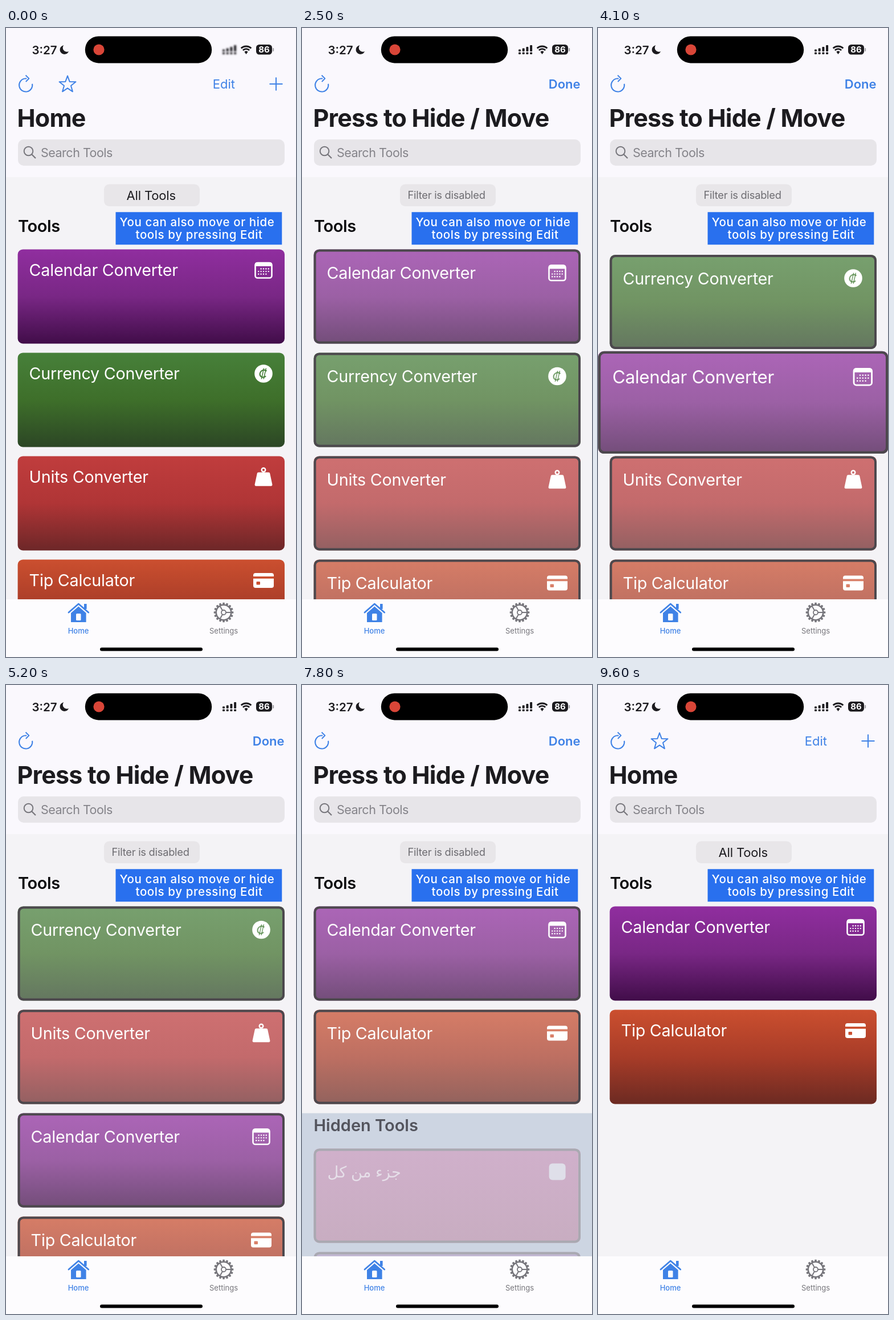
Animation of 509 by 1101 pixels, one loop 9.7 s. Source, as an HTML page with a canvas:

```html
<!DOCTYPE html>
<html lang="en">
<head>
<meta charset="utf-8">
<title>Editing tools</title>
<style>
  html, body { margin: 0; width: 509px; height: 1101px; overflow: hidden; background: #f4f3f6; }
  canvas { display: block; }
</style>
</head>
<body>
<canvas id="stage" width="509" height="1101"></canvas>
<script>
const ctx = document.getElementById('stage').getContext('2d');
const LOOP = 9700, STEP = 100;
const BLUE = '#3f82e6', INK = '#1c1b1f', GREY = '#77767c';
const CARD = { x: 20.6, y: 387.4, w: 468.4, h: 165, pitch: 181 };

const tools = {
  calendar: { title: 'Calendar Converter', colors: ['#902e9f', '#792785', '#410d49'], icon: calendarIcon },
  currency: { title: 'Currency Converter', colors: ['#47803a', '#3e6f2a', '#2c4625'], icon: currencyIcon },
  units: { title: 'Units Converter', colors: ['#c03d3d', '#b03536', '#6d2728'], icon: weightIcon },
  tip: { title: 'Tip Calculator', colors: ['#cb4f2f', '#a83c28', '#6c2a22'], icon: paymentIcon }
};

const clamp = v => Math.max(0, Math.min(1, v));
const ramp = (t, from, to) => clamp((t - from) / (to - from));
const easeOut = (t, from, to) => 1 - (1 - ramp(t, from, to)) ** 3;
const easeBoth = (t, from, to) => { const u = ramp(t, from, to); return u * u * (3 - 2 * u); };

function box(x, y, w, h, r, color) {
  ctx.beginPath();
  ctx.roundRect(x, y, w, h, r);
  ctx.fillStyle = color;
  ctx.fill();
}

function disc(x, y, r, color) {
  ctx.beginPath();
  ctx.arc(x, y, r, 0, 7);
  ctx.fillStyle = color;
  ctx.fill();
}

function shape(points, close) {
  ctx.beginPath();
  points.forEach(p => ctx.lineTo(...p));
  if (close) ctx.closePath();
}

function stroke(color, width) {
  ctx.strokeStyle = color;
  ctx.lineWidth = width;
  ctx.stroke();
}

function text(str, x, y, size, color, { weight = 400, spacing = 0, align = 'left' } = {}) {
  ctx.font = `${weight} ${size}px Inter, "DejaVu Sans", sans-serif`;
  ctx.letterSpacing = spacing + 'px';
  ctx.textAlign = align;
  ctx.fillStyle = color;
  ctx.fillText(str, x, y);
}

function at(x, y, draw) {
  ctx.save();
  ctx.translate(x, y);
  draw();
  ctx.restore();
}

function withAlpha(alpha, draw) {
  if (alpha <= 0) return;
  ctx.save();
  ctx.globalAlpha *= alpha;
  draw();
  ctx.restore();
}

// Card icons, centred on the current origin
function calendarIcon() {
  ctx.beginPath();
  ctx.roundRect(-14.5, -13, 29, 26.5, 4);
  stroke('#fff', 2.6);
  box(-15, -14, 30, 7, [4, 4, 0, 0], '#fff');
  for (let row = 0; row < 3; row++)
    for (let col = 0; col < 5; col++)
      if (!(row === 0 && col < 1) && !(row === 2 && col > 3))
        disc(col * 4.4 - 8.8, row * 4.6 - 2.5, 1.2, '#fff');
}

function currencyIcon(hole) {
  disc(0, 0, 15.8, '#fff');
  hole(color => {
    ctx.transform(1, 0, -0.12, 1, 0, 0);
    ctx.beginPath();
    ctx.arc(0, 0, 6.4, 0.75, 5.55);
    stroke(color, 2.2);
    ctx.beginPath();
    for (const x of [-1.5, 2.3]) {
      ctx.moveTo(x - 1, 9.5);
      ctx.lineTo(x + 1, -9.5);
    }
    stroke(color, 1.6);
  });
}

function weightIcon() {
  ctx.beginPath();
  ctx.arc(0, -12.5, 3.3, 0, 7);
  stroke('#fff', 2.4);
  ctx.lineJoin = 'round';
  shape([[-9, -6], [9, -6], [13.2, 13.5], [-13.2, 13.5]], true);
  ctx.fillStyle = '#fff';
  ctx.fill();
  stroke('#fff', 4.5);
}

function paymentIcon(hole) {
  box(-18, -13, 36, 26, 4, '#fff');
  hole(color => {
    box(-18, -7, 36, 3.8, 0, color);
    box(-12.5, 2, 6.5, 5.5, 1, color);
  });
}

function cardFill(colors) {
  const fill = ctx.createLinearGradient(0, 0, 0, CARD.h);
  colors.forEach((c, i) => fill.addColorStop(i / (colors.length - 1), c));
  box(0, 0, CARD.w, CARD.h, 9, fill);
}

function cardBorder(color) {
  ctx.beginPath();
  ctx.roundRect(2, 2, CARD.w - 4, CARD.h - 4, 8);
  stroke(color, 4);
}

function toolCard(tool, slot, edit, scale = 1, alpha = 1) {
  const solid = 1 - 0.28 * edit;
  withAlpha(alpha, () => at(CARD.x + CARD.w / 2, CARD.y + slot * CARD.pitch + CARD.h / 2, () => {
    ctx.scale(scale, scale);
    ctx.translate(-CARD.w / 2, -CARD.h / 2);
    if (scale > 1) box(0, 0, CARD.w, CARD.h, 9, '#f4f3f6');
    withAlpha(solid, () => cardFill(tool.colors));
    withAlpha(edit, () => cardBorder('#4c484d'));
    text(tool.title, 20 + 3 * edit, 46.6 + 5 * edit, 28.7, '#fff', { spacing: -0.22 });
    at(431.4 - 4 * edit, 36.6 + 4.5 * edit, () =>
      tool.icon(draw => withAlpha(solid, () => draw(tool.colors[0]))));
  }));
}

function hiddenSection(y) {
  box(0, y, 509, 1101 - y, 0, '#cdd5e2');
  text('Hidden Tools', 20.5, y + 31.6, 29, '#53545d', { weight: 600 });
  at(CARD.x, y + 62, () => {
    cardFill(['#d0b0cb', '#c8adc1']);
    cardBorder('#a9a9b1');
    text('جزء من كل', 24, 51, 27.3, '#e6dfe9');
    box(413, 26, 29, 29, 6, '#dfdfe9');
    ctx.translate(0, CARD.pitch);
    cardFill(['#c2b8d3', '#b5adc4']);
    cardBorder('#a9a9b1');
  });
}

function statusBar(t) {
  text('3:27', 45.5, 45.5, 20.5, INK, { weight: 600 });
  ctx.beginPath();
  ctx.arc(102.5, 38, 8, -1.75, 0.35, true);
  ctx.arc(107, 34.5, 7.2, 0.95, -2.45);
  ctx.fillStyle = INK;
  ctx.fill();

  box(138.8, 14.4, 222.4, 47, 23.5, '#000');
  disc(163, 38, 9.6, '#d94638');

  ctx.save();
  if (t < 300) ctx.filter = 'blur(1.5px)';
  for (let i = 0; i < 4; i++) {
    const h = [3.5, 5.5, 8, 11][i];
    box(380 + i * 6.7, 41 - h, 4, h, 1, INK);
    box(380 + i * 6.7, 42.5, 4, 3.5, 1, INK);
  }
  ctx.restore();

  for (const r of [13, 8.3]) {
    ctx.beginPath();
    ctx.arc(421.5, 45, r, -2.32, -0.82);
    stroke(INK, 2.8);
  }
  ctx.beginPath();
  ctx.moveTo(421.5, 46);
  ctx.arc(421.5, 45, 4.5, -2.32, -0.82);
  ctx.fillStyle = INK;
  ctx.fill();

  box(439, 29, 28, 17.5, 5.5, INK);
  box(468, 35, 2.2, 6, 1, '#a5a4a8');
  text('86', 453, 43.2, 15, '#fff', { weight: 700, align: 'center' });
}

function refreshIcon() {
  ctx.beginPath();
  ctx.arc(34.7, 100, 11.6, -0.2, 4.85);
  stroke(BLUE, 2);
  shape([[34.5, 82.8], [40.3, 88.4], [34.8, 94]]);
  stroke(BLUE, 2);
}

function homeToolbar() {
  const star = Array.from({ length: 10 }, (_, i) => {
    const r = i % 2 ? 6.3 : 15.2, a = i * Math.PI / 5 - Math.PI / 2;
    return [108 + r * Math.cos(a), 99 + r * Math.sin(a)];
  });
  shape(star, true);
  stroke(BLUE, 2);
  text('Edit', 362.8, 106, 22, BLUE);
  shape([[462.5, 98], [485.5, 98]]);
  stroke(BLUE, 2);
  shape([[474, 86.5], [474, 109.5]]);
  stroke(BLUE, 2);
}

function header(t, editing, doneAlpha) {
  box(0, 0, 509, 261, 0, '#faf8fd');
  statusBar(t);
  refreshIcon();
  if (editing) withAlpha(doneAlpha, () => text('Done', 488.5, 106, 22, BLUE, { weight: 600, align: 'right' }));
  else homeToolbar();
  text(editing ? 'Press to Hide / Move' : 'Home', 19.5, 173, 43, INK, { weight: 700, spacing: -0.8 });

  box(21, 195, 468, 46, 10, '#e7e5e9');
  ctx.beginPath();
  ctx.arc(39.5, 215.5, 7.8, 0, 7);
  stroke(GREY, 2);
  shape([[45, 221], [52, 228]]);
  stroke(GREY, 2.2);
  text('Search Tools', 61, 225.5, 21.5, '#848389', { spacing: -0.5 });

  box(172, 273.5, 168, 38.5, 9, '#e8e6e9');
  if (editing) text('Filter is disabled', 185.5, 299.3, 18.3, '#6d6c71', { spacing: -0.25 });
  else text('All Tools', 211.5, 301, 22, INK, { spacing: -0.15 });
  text('Tools', 21, 357, 29, '#0d0d0f', { weight: 600, spacing: -0.4 });
}

function tabBar() {
  box(0, 1000, 509, 101, 0, '#fdfcfe');
  ctx.lineJoin = 'round';
  ctx.lineCap = 'round';
  shape([[110, 1023], [127.3, 1008], [144.7, 1023]]);
  stroke(BLUE, 2.8);
  ctx.lineCap = 'butt';
  box(137, 1008, 4.6, 9, 0, BLUE);
  shape([[114, 1024], [127.3, 1012.5], [140.6, 1024], [140.6, 1040], [114, 1040]], true);
  ctx.fill();
  box(123, 1025, 8.5, 12, 1.5, '#fdfcfe');
  text('Home', 127, 1059.5, 13, BLUE, { weight: 500, align: 'center' });

  at(382, 1023, () => {
    ctx.beginPath();
    ctx.arc(0, 0, 13.2, 0, 7);
    stroke(GREY, 2.6);
    for (let i = 0; i < 16; i++) {
      ctx.rotate(Math.PI / 8);
      box(13.5, -1.8, 3.8, 3.6, 0.8, GREY);
    }
    ctx.beginPath();
    ctx.arc(0, 0, 4, 0, 7);
    stroke(GREY, 1.8);
    for (let i = 0; i < 3; i++) {
      shape([[4, 0], [13, 0]]);
      stroke(GREY, 2);
      ctx.rotate(Math.PI * 2 / 3);
    }
  });
  text('Settings', 382, 1059.5, 13, GREY, { align: 'center' });
  box(165, 1084.5, 180, 6, 3, '#000');
}

function banner() {
  box(192.5, 322.3, 291.8, 57, 0, '#2970ee');
  const style = { weight: 500, spacing: 0.6 };
  text('You can also move or hide', 199.5, 346.8, 20.5, '#fff', style);
  text('tools by pressing Edit', 227.5, 368.6, 20.5, '#fff', style);
}

function render(t) {
  const editing = t >= 1100 && t < 8700;
  const edit = ramp(t, 1000, 1200) - ramp(t, 8600, 8800);
  const doneAlpha = 0.15 + 0.85 * ramp(t, 1350, 1600);

  // The calendar card is dragged past two neighbours, then two cards are hidden
  const lift = easeOut(t, 3050, 3350) - easeOut(t, 4850, 5100);
  const drag = 1.025 * easeBoth(t, 3400, 4050) + 0.975 * easeBoth(t, 4150, 4800);
  const passCurrency = easeOut(t, 3850, 4250);
  const passUnits = easeOut(t, 4500, 4900);
  const hideCurrency = easeOut(t, 5900, 6300);
  const hideUnits = easeOut(t, 6600, 7000);
  const hidden = hideCurrency + hideUnits;

  box(0, 0, 509, 1101, 0, '#f4f3f6');
  header(t, editing, doneAlpha);
  withAlpha(edit, () => hiddenSection(CARD.y + CARD.pitch * (4 - hidden)));
  toolCard(tools.currency, 1 - passCurrency, edit, 1, 1 - hideCurrency);
  toolCard(tools.units, 2 - passUnits - hideCurrency, edit, 1, 1 - hideUnits);
  toolCard(tools.tip, 3 - hidden, edit);
  toolCard(tools.calendar, drag - hidden, edit, 1 + 0.087 * lift);
  tabBar();
  banner();
}

const start = performance.now();
function frame() {
  const t = (performance.now() - start) % LOOP;
  render(Math.floor(t / STEP) * STEP);
  requestAnimationFrame(frame);
}
frame();
</script>
</body>
</html>
```
